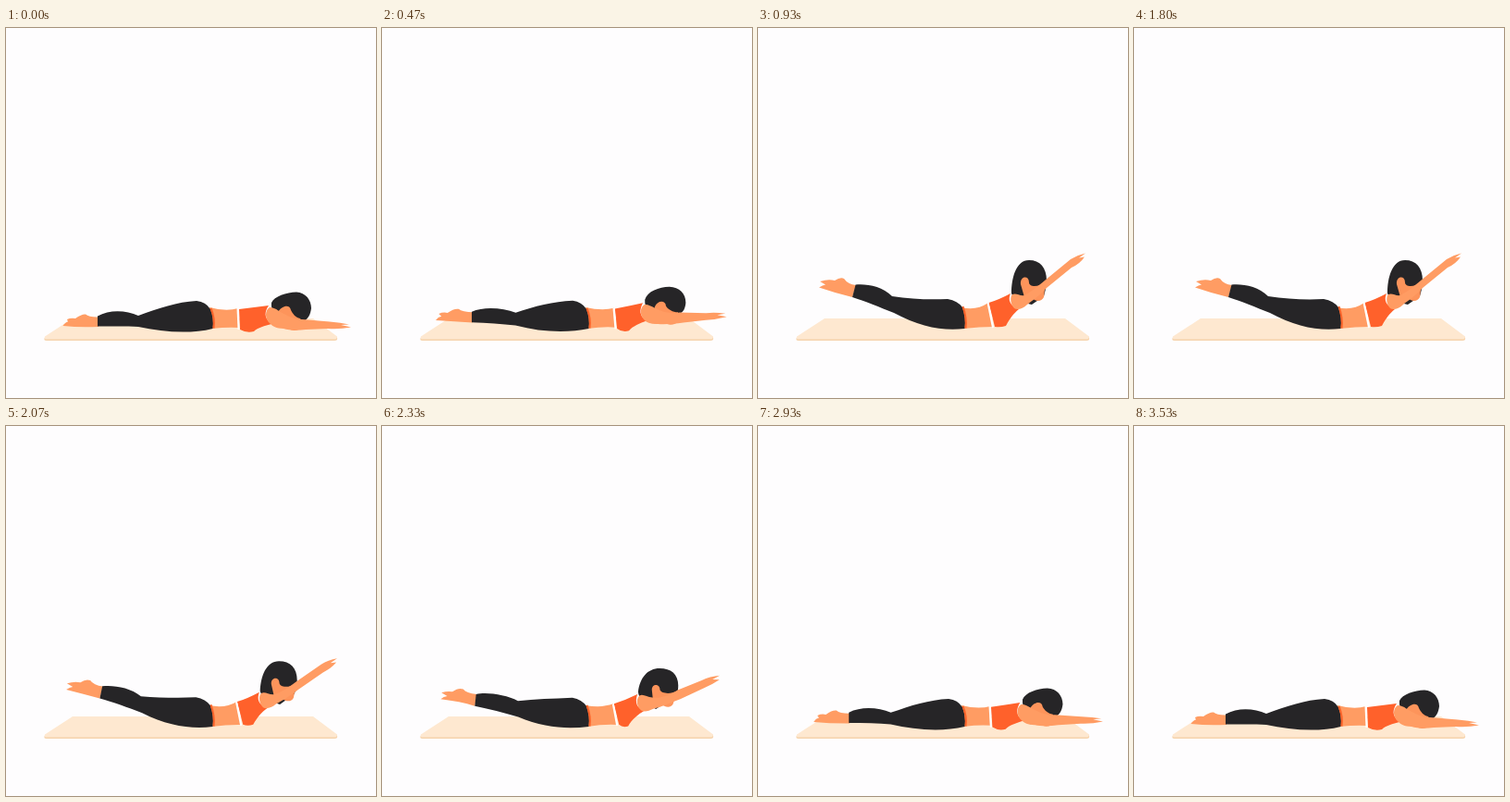
Recreate the animation shown at these times as an HTML page. Size 400 by 400 pixels, loop 3670 ms.

```html
<!DOCTYPE html>
<html lang="en">
<head>
<meta charset="utf-8">
<title>Prone lift exercise</title>
<style>
  html, body { margin: 0; width: 100%; height: 100%; overflow: hidden; background: #fefdfe; }
  svg { display: block; width: 100%; height: 100%; }
  .skin { fill: #ff9c63; }
  .face { fill: #fd945b; }
  .dark { fill: #262527; }
  .top { fill: #ff612b; }
  .band { fill: none; stroke: #fb6229; stroke-width: 2; }
  .strap { fill: none; stroke: #fff; stroke-width: 2; }
</style>
</head>
<body>
<svg viewBox="0 0 400 400">
  <path fill="#f6d3ac" d="M72 315H332L358 334.5Q359 338 355 338H44Q40 338 42 334.5Z"/>
  <path fill="#fee8d0" d="M72 314H332L358 333.5Q358 336.4 355 336.4H44Q41 336.4 42 333.5Z"/>
  <g id="body"></g>
</svg>
<script>
const LOOP = 3670, STEP = 200 / 3;

// Lift amount over time: [ms, amount]
const LIFT = [
  [0, 0], [290, 0], [400, .05], [530, .23], [670, .54], [800, .86], [930, .97],
  [1100, .995], [1270, 1], [1600, 1], [1800, .97], [1970, .92], [2130, .83],
  [2330, .63], [2670, .26], [2800, .14], [2930, .05], [3130, .01], [3340, 0], [LOOP, 0]
];

// Lift amounts at which the middle and last pose of each part are drawn
const [MID, HIGH] = [.54, .97];

// [class, lying, half lifted, lifted], back to front
const PARTS = [
  ['skin foot',
    'M66 315Q70 313 75 314Q82 309 86 309.5Q90 313 101 312.5L100 323Q80 324 61.5 322Q64 318 67 317.5Z',
    'M64 292Q70 290 75 291Q82 286 87 288Q90 292 102 293L100 305.5Q84 301 63 299Q66 296 70 295.5Z',
    'M67 274Q76 271 83 273Q89 269 93 271Q97 277 106 278L102 291Q85 287 66 280.5Q70 278 73 277.5Z'],
  ['skin belly',
    'M220 302Q238 307 251 303L252 324Q240 323 222 325Z',
    'M220 302Q238 305 250 301L254 323Q240 322 222 325Z',
    'M220 302Q236 306 249 297L254 323Q240 323 222 325Z'],
  ['dark legs',
    'M99 311.5C112 304 130 305 143 311C165 303 185 296 206 295Q216 296 221 304Q225 314 223.5 325C200 331 170 329 143 323C130 322 115 322.5 99 322.5Z',
    'M101 293C113 290 134 293 147 299C165 296 185 295 206 294Q216 296 221 303Q225 314 223.5 325C200 328 175 327 147 316C132 312 115 308 100 305.5Z',
    'M105.5 277.5C118 276.5 134 279 145 290C165 293 185 294 205 293Q216 295 221 302Q225 314 223.5 325C200 328 175 323 147 308C132 302 115 295 102 291Z'],
  ['band',
    'M221.5 303Q226 314 224.5 324.5',
    'M221.5 302Q226 314 224.5 324.5',
    'M221.5 301Q226 314 224.5 324.5'],
  ['top',
    'M252 304Q268 302 284 300C280 306 278 313 287 320C280 322 272 324 268 328Q260 330 253 326Z',
    'M251 301Q264 297 277 291C274 300 276 306 284 309C277 313 270 318 266 325Q260 327 256 323Z',
    'M249.5 297Q260 294 273 287C270 294 272 300 282 304C276 309 273 313 268 322Q262 324 256 323Z'],
  ['strap', 'M250.5 303L251.5 326', 'M250 301L254 324', 'M248.5 297L254 324'],
  ['dark hair',
    'M287 297C290 290 303 286 314 285.5C324 286 330 294 330 303C329 310 327 314 322 317L294 324C293 310 286 307 287 297Z',
    'M278 288C280 274 289 265 302 265C314 265 322 271 322 283C322 288 321 292 318 294L296 308C291 304 278 298 278 288Z',
    'M274 287C274 270 279 251 293 251C305 251 312 259 312 273C312 280 310 286 309 290L296 299C288 297 276 293 274 287Z'],
  ['face',
    'M294 307C298 300 307 298 308 305C310 309 313 313 318 314L322 322C317 328 308 328 306 325L292 318Z',
    'M293 288C293 281 302 281 302 288C304 292 313 293 320 290L316 303C314 308 306 307 303 303L294 302Z',
    'M284 277C283 268 293 267 293 275C293 280 303 281 311 274L309 291C306 297 299 295 296 292L288 291Z'],
  ['skin arm',
    'M285 302C288 302 291 303 295 306C302 310 310 315 320 315L350 317.5Q362 318.5 371 320.5L362 321L373 323.5Q360 326 348 325L324 326C316 327 306 327 300 325C292 325 288 322 286 320C279 314 280 305 285 302Z',
    'M279 293C282 290 287 294 293 295C302 297 312 294 321 289L347 281Q356 277 367 276.5L359 280.5L367 281Q358 286 350 289L324 299C314 302 304 306 294 308C289 310 284 311 281 309C276 305 275 297 279 293Z',
    'M275 288C279 286 283 290 288 289C296 285 304 278 310 273L338 250Q345 245.5 354 243.5L347 248.5L353 247.5Q348 255 339 259L312 281C306 288 296 295 291 299C286 304 280 305 277 303C273 299 272 291 275 288Z']
];

const NUM = /\d+(?:\.\d+)?/g;
const body = document.getElementById('body');
const parts = PARTS.map(([cls, ...poses]) => {
  const el = document.createElementNS('http://www.w3.org/2000/svg', 'path');
  el.setAttribute('class', cls);
  body.append(el);
  return { el, shape: poses[0], nums: poses.map(d => d.match(NUM).map(Number)) };
});

function liftAt(t) {
  const i = LIFT.findIndex(k => k[0] > t);
  const [t0, a] = LIFT[i - 1], [t1, b] = LIFT[i];
  return a + (b - a) * (t - t0) / (t1 - t0);
}

function draw(p) {
  // quadratic blend through the three poses
  const w = [
    (p - MID) * (p - HIGH) / (MID * HIGH),
    p * (p - HIGH) / (MID * (MID - HIGH)),
    p * (p - MID) / (HIGH * (HIGH - MID))
  ];
  // the legs stretch a little as they leave the mat
  const reach = p < MID ? 5 * Math.sin(Math.PI * p / MID) : 0;
  for (const { el, shape, nums } of parts) {
    let i = 0;
    el.setAttribute('d', shape.replace(NUM, () => {
      let v = w[0] * nums[0][i] + w[1] * nums[1][i] + w[2] * nums[2][i];
      if (i++ % 2 === 0) v -= reach * Math.max(0, (150 - v) / 90);
      return v.toFixed(2);
    }));
  }
}

const start = performance.now();
function frame() {
  const t = (performance.now() - start) % LOOP;
  draw(liftAt(Math.min(Math.floor((t + 4) / STEP) * STEP, LOOP - 1)));
  requestAnimationFrame(frame);
}
frame();
</script>
</body>
</html>
```
